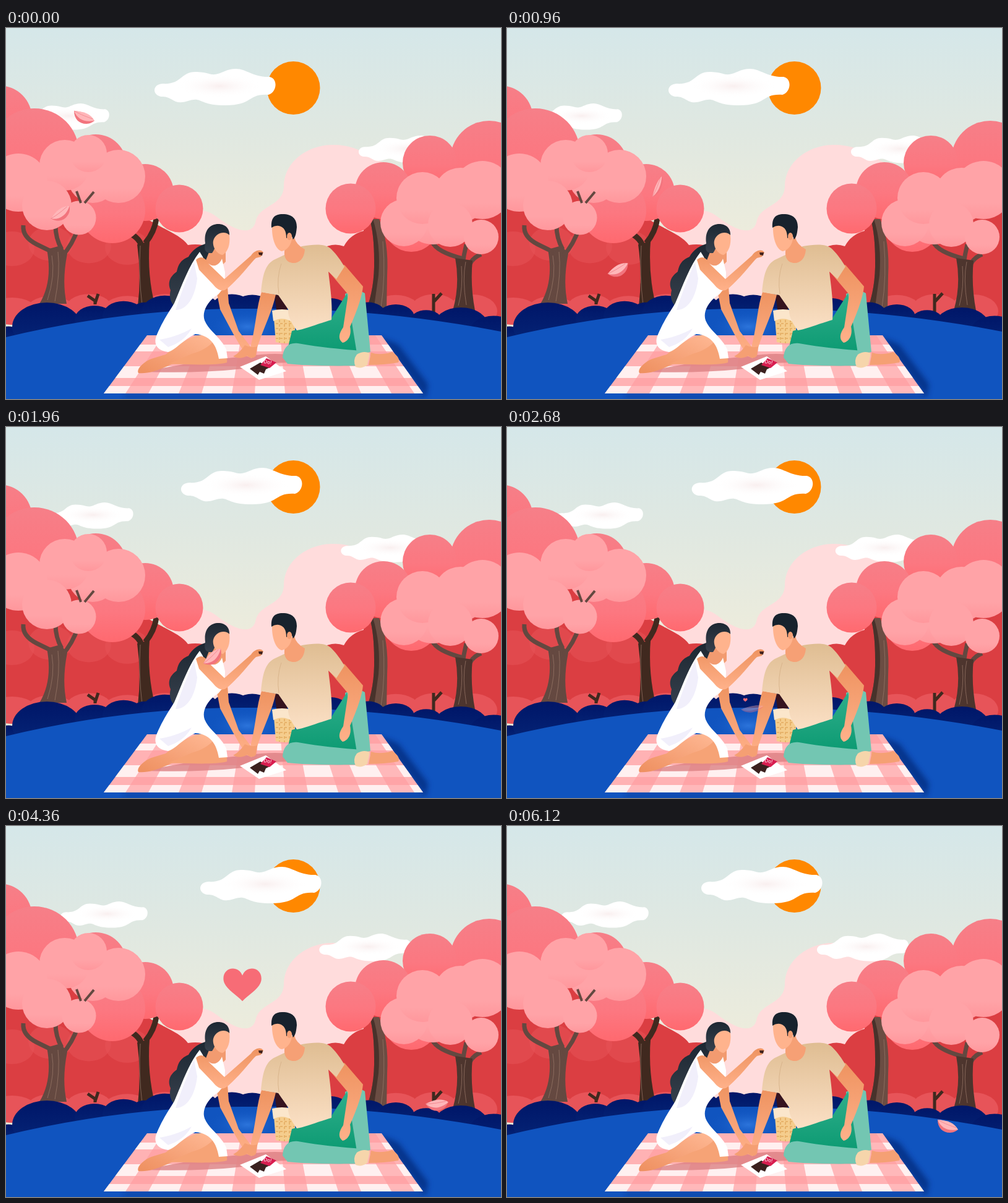
Write an HTML page that moves like this. It is 800x600 px and loops after 6240 ms.

```html
<!DOCTYPE html>
<html lang="en">
<head>
<meta charset="utf-8">
<title>Spring picnic</title>
<style>
html, body { margin: 0; width: 100%; height: 100%; overflow: hidden; background: #dfe8e4; }
svg { display: block; width: 100vw; height: 100vh; }
.limb { fill: none; stroke: #634840; }
.grain { fill: none; stroke: #9b7a6b; stroke-width: .7; }
</style>
</head>
<body>
<svg viewBox="0 0 800 600">
<defs>
  <linearGradient id="sky" gradientUnits="userSpaceOnUse" x1="0" y1="0" x2="0" y2="340">
    <stop offset="0" stop-color="#d5e7e9"/><stop offset=".5" stop-color="#e0e8e1"/><stop offset="1" stop-color="#edecdc"/>
  </linearGradient>
  <linearGradient id="crown" x1="0" y1="0" x2="0" y2="1">
    <stop offset="0" stop-color="#f67f88"/><stop offset=".55" stop-color="#fc7780"/><stop offset="1" stop-color="#ff696f"/>
  </linearGradient>
  <linearGradient id="bloom" x1="0" y1="0" x2="0" y2="1">
    <stop offset=".72" stop-color="#ffa3a7"/><stop offset="1" stop-color="#ff979c"/>
  </linearGradient>
  <linearGradient id="bark">
    <stop offset="0" stop-color="#644840"/><stop offset=".6" stop-color="#6e5046"/><stop offset="1" stop-color="#4b332c"/>
  </linearGradient>
  <linearGradient id="bush" x1="0" y1="0" x2="0" y2="1">
    <stop offset="0" stop-color="#001668"/><stop offset="1" stop-color="#062779"/>
  </linearGradient>
  <linearGradient id="shirt" x1="0" y1="0" x2="0" y2="1">
    <stop offset="0" stop-color="#dfbd92"/><stop offset="1" stop-color="#fbe0c5"/>
  </linearGradient>
  <linearGradient id="skin" x1="0" y1="0" x2="0" y2="1">
    <stop offset="0" stop-color="#ee9360"/><stop offset="1" stop-color="#ffb18a"/>
  </linearGradient>
  <linearGradient id="leg" x1="0" y1="1" x2="1" y2="0">
    <stop offset="0" stop-color="#ee8f5f"/><stop offset="1" stop-color="#ffb995"/>
  </linearGradient>
  <linearGradient id="hair" x1="0" y1="0" x2="0" y2="1">
    <stop offset="0" stop-color="#1d2732"/><stop offset="1" stop-color="#37414d"/>
  </linearGradient>
  <linearGradient id="green" x1="0" y1="0" x2="0" y2="1">
    <stop offset="0" stop-color="#2fae8b"/><stop offset="1" stop-color="#0c9a72"/>
  </linearGradient>
  <radialGradient id="glow"><stop offset="0" stop-color="#2c74db"/><stop offset="1" stop-color="#1054bf" stop-opacity="0"/></radialGradient>
  <radialGradient id="blush"><stop offset="0" stop-color="#f9efef"/><stop offset="1" stop-color="#fff" stop-opacity="0"/></radialGradient>
  <filter id="soft" x="-30%" y="-30%" width="160%" height="160%"><feGaussianBlur stdDeviation="4"/></filter>
  <g id="cloud">
    <path d="M11 45C-4 43-4 25 13 24C44 26 42 5 66 5C86 5 88 10 98 9S116 0 132 0S160 14 186 13C200 16 198 38 184 42C150 40 160 59 115 59S78 44 54 52S30 44 11 45Z" fill="#fff"/>
    <ellipse cx="105" cy="28" rx="70" ry="19" fill="url(#blush)"/>
  </g>
  <g id="petal">
    <path d="M-16-11C-16 2-8 10 4 10C10 10 14 7 17 5C10-6 0-9-16-11Z" fill="#f2747d"/>
    <path d="M-16-11C-11 2 0 8 17 5C11-6 0-10-16-11Z" fill="#ffb6b9"/>
    <path d="M-16-11C-4-4 6-1 14 2" fill="none" stroke="#f0828a" stroke-width=".8"/>
  </g>
</defs>

<rect width="800" height="600" fill="url(#sky)"/>
<circle cx="464.500" cy="97" r="43" fill="#ff8800"/>
<path d="M270 330C290 290 318 288 340 305S395 340 403 315C408 285 446 290 449 258C448 215 490 189 527 189C575 188 590 215 625 222L650 480H270Z" fill="#ffdcdc"/>
<g id="sailing"></g>

<path d="M0 250H230V310C260 328 282 335 294 351Q306 349 318 351V460H0ZM508 358Q528 346 546 353Q556 334 578 328V280H800V480H520Z" fill="#db3e42"/>
<g id="rosy" fill="#e75459"></g>

<path d="M212 350Q219 400 213 450H241Q228 400 232 345Z" fill="#40291f"/>
<path d="M202 333Q220 343 221 362M243 308Q240 330 225 348" class="limb" style="stroke:#40291f" stroke-width="9"/>
<path d="M132 433L145 442L149 430M144 440V447M691 430V462M692 442L704 429" class="limb" style="stroke:#40291f" stroke-width="5"/>
<path d="M588 309H603Q619 345 616 400L615 457H582Q596 420 595 375Q595 335 588 309Z" fill="#6b4d43"/>
<path d="M588 309H593Q606 350 602 400L594 457H582Q596 420 595 375Q595 335 588 309Z" fill="#48322b"/>
<path d="M217 352Q214 400 220 448M609 345Q614 400 606 452" class="grain"/>

<g id="back" fill="url(#crown)"></g>
<g stroke-width="7">
  <path d="M28 319Q26 338 50 350T80 364M80 320Q80 340 90 358M117 322Q108 350 90 370" class="limb"/>
  <path d="M689 346Q696 362 738 373M744 350Q740 366 738 382M768 366Q752 372 747 388" class="limb"/>
</g>
<path d="M66 358Q76 410 54 446H98Q90 410 99 365L88 352ZM726 372Q734 415 722 457H758Q750 415 754 376Z" fill="url(#bark)"/>
<path d="M84 362Q88 395 79 442M74 368Q80 400 67 440M743 378Q737 405 744 448M736 385Q739 420 731 449" class="grain"/>
<g id="front" fill="url(#bloom)"></g>
<path d="M114 264L121 283M142 265L127 283" class="limb" stroke-width="4"/>

<g id="bushes" fill="url(#bush)"></g>
<path d="M0 500Q200 452 400 454Q600 452 800 491V600H0Z" fill="#1054bf"/>
<ellipse cx="390" cy="483" rx="65" ry="28" fill="url(#glow)"/>
<path d="M604 499L676 594H190V597H679L682 576L634 512Z" fill="#03216f" opacity=".65" filter="url(#soft)"/>
<path d="M228 497H607L674 591H158Z" fill="#ffa4a7"/>
<g id="check" fill="#fff"></g>
<path d="M222 556Q310 538 386 531Q430 525 452 528L458 541Q400 542 384 551Q310 559 222 556Z" fill="#dc8184" opacity=".8"/>

<g id="basket">
  <path d="M434 433Q440 428 445 432L455 441L454 462H438Z" fill="#35131f"/>
  <path d="M433 470H467V508Q452 512 436 508Z" fill="#f5cd8d"/>
  <path d="M436 478H466M436 486H466M436 494H466M436 502H466M442 472V509M450 472V510M458 472V509" stroke="#e7b36b" stroke-width="2" stroke-dasharray="4 3"/>
  <path d="M430 457Q447 453 460 457L470 480Q449 464 432 474Z" fill="#fbe6cb"/>
</g>

<g id="woman">
  <path d="M328 348C312 350 300 360 295 370C280 376 278 386 276 394C262 404 262 415 266 424C262 440 270 448 277 456C290 440 296 410 332 368Z" fill="url(#hair)"/>
  <path d="M333 350L355 363V378L343 390L322 378Z" fill="#f29b70"/>
  <path d="M341 430L358 418L360 445L376 490L398 519L397 534L388 530L368 496L346 455Z" fill="url(#skin)"/>
  <path d="M258 528C280 510 300 497 318 496C332 498 339 506 336 516C332 527 300 533 265 545C250 552 230 560 214 558C210 552 222 540 235 535Z" fill="url(#leg)"/>
  <path d="M300 527C320 522 335 510 338 502C350 518 359 530 357 541C335 547 290 543 262 544Z" fill="#f6a376"/>
  <path d="M313 362L318 370C325 387 342 390 349 373L354 395C354 415 348 430 338 434C322 447 317 462 321 473C328 490 347 500 356 520L358 534L344 535C340 512 330 497 306 495C285 505 275 520 262 524C245 522 238 512 243 498C255 470 262 462 272 445C285 415 295 385 313 362Z" fill="#fff"/>
  <path d="M304 378C294 402 282 430 274 456C292 457 306 435 309 405ZM248 504Q275 500 300 486Q288 508 262 516Z" fill="#f1effb"/>
  <path d="M322 348C319 325 332 316 345 317C357 318 362 327 361 336L345 336C339 345 340 355 333 364C321 365 320 357 322 348Z" fill="url(#hair)"/>
  <path d="M335 344C339 330 355 328 361 335C363 350 358 363 350 367C341 366 333 354 335 344Z" fill="#ffb38d"/>
  <path d="M307 375C315 367 323 372 328 382L353 406L396 368C402 359 412 357 416 363L412 370L404 372C396 379 380 402 358 421C350 428 342 424 334 414L312 391Z" fill="url(#skin)"/>
  <path d="M408 363L415 363L414 368L409 367Z" fill="#43231d"/>
</g>

<g id="man">
  <path d="M413 427L436 431C430 460 414 490 405 520L403 531L394 532L396 512C404 480 405 450 413 427Z" fill="url(#skin)"/>
  <path d="M367 531Q377 526 386 513Q397 518 406 515L404 530Q398 537 390 530Q378 537 367 531Z" fill="#f59f73"/>
  <path d="M548 430Q566 420 580 429L589 524L568 528L552 490Z" fill="#73c6b2"/>
  <path d="M462 490L524 472Q538 450 551 429L558 470L567 526L455 520Z" fill="url(#green)"/>
  <path d="M447 533C448 517 456 508 472 510C500 515 530 519 586 523L570 546C530 547 480 546 455 543Z" fill="#73c6b2"/>
  <path d="M520 392L547 383L577 418Q575 440 556 483C559 497 553 507 544 509C536 503 538 494 545 484L553 431Z" fill="url(#skin)"/>
  <path d="M590 525Q604 530 624 524Q638 533 634 541Q610 545 586 545Z" fill="#f5a074"/>
  <path d="M567 528Q578 521 588 526L584 545Q574 552 565 548Q560 537 567 528Z" fill="#f6d5ab"/>
  <path d="M412 427C415 400 418 382 435 374L452 366L478 353C500 349 518 349 526 358C535 367 541 376 547 386L534 406L521 394C524 420 528 445 526 472C508 477 484 487 470 489C461 477 455 465 456 455L440 432Z" fill="url(#shirt)"/>
  <path d="M441 430Q437 404 445 381" fill="none" stroke="#d9b58c"/>
  <path d="M452 347L466 338Q468 350 483 358C482 373 474 381 463 380C454 379 449 372 450 361Z" fill="#f6a075"/>
  <path d="M430 318C440 313 457 318 462 335C463 350 454 360 445 361C435 357 429 340 430 318Z" fill="#ffb38d"/>
  <path d="M429 323C428 307 434 301 447 301C463 301 470 309 470 322C469 332 468 338 464 342L461 334L453 340C453 329 450 322 441 320Q435 319 429 323Z" fill="#17222d"/>
  <ellipse cx="458" cy="337" rx="4" ry="6" fill="#f6a075"/>
</g>

<path d="M378 548L420 531L453 555L409 569Z" fill="#fff"/>
<path d="M394 551L411 541L426 549L420 552L417 559L410 556L407 561Z" fill="#3b211f"/>
<path d="M411 545L421 534L437 541L426 550Z" fill="#d81e50"/>
<text transform="translate(416 542) rotate(9)" font-family="Inter, Arial, sans-serif" font-size="8" fill="#fff">Do!</text>

<path id="heart" d="M0 37C-16 20-43 7-43-14C-43-41-9-45 0-21C9-45 43-41 43-14C43 7 16 20 0 37Z" fill="#f76c76"/>
<g id="falling"></g>
</svg>
<script>
const LOOP = 6240, STEP = 40, LAST = 6120;
const $ = id => document.getElementById(id);
const lerp = (a, b, k) => a + (b - a) * k;
const clamp = k => Math.min(1, Math.max(0, k));
const easeOut = (k, power) => 1 - (1 - k) ** power;

function add(parent, tag, attrs) {
  const node = document.createElementNS("http://www.w3.org/2000/svg", tag);
  for (const key in attrs) node.setAttribute(key, attrs[key]);
  $(parent).append(node);
  return node;
}
const oval = (parent, cx, cy, rx, ry = rx) => add(parent, "ellipse", { cx, cy, rx, ry });

// Tree crowns: x, y, radius.
const crowns = {
  back: [[-11, 146, 53], [145, 222, 50], [46, 202, 72], [225, 266, 46], [172, 295, 53], [280, 292, 38.5],
    [781, 213, 63], [685, 218, 44], [610, 263, 46], [655, 318, 44], [557, 292, 40.5]],
  front: [[140, 243, 40], [182, 240, 43], [95, 222, 41], [133, 203, 30], [20, 250, 47], [66, 287, 40], [118, 307, 27.5],
    [690, 300, 50], [735, 270, 44], [770, 262, 47], [643, 315, 38], [673, 275, 42], [718, 318, 36], [768, 338, 28]]
};
for (const name in crowns) crowns[name].forEach(c => oval(name, ...c));

// Undergrowth in two scalloped rows on each side.
let seed = 7;
const random = () => (seed = seed * 16807 % 2147483647) / 2147483647;
for (let x = 10; x < 810; x += 62) {
  if (x > 290 && x < 590) continue;
  oval("rosy", x, 458, 40, 22 + 8 * random());
  if (x < 220) oval("rosy", x, 346 + 12 * random(), 36, 28).setAttribute("opacity", .5);
}

// Bushes sit on the curve of the hill: x, half width.
const hill = x => 454 + 42 * ((x - 400) / 400) ** 2;
[[4, 18], [66, 56], [143, 32], [190, 34], [225, 26], [257, 38], [310, 36], [365, 34], [398, 32], [440, 36],
  [525, 30], [585, 28], [630, 30], [679, 26], [735, 45], [788, 40]]
  .forEach(([x, r]) => oval("bushes", x, hill(x), r, r * .7));

// Gingham cloth in perspective.
function cell(u0, u1, y0, y1, opacity) {
  const edge = (u, y) => {
    const k = (y - 497) / 94;
    return lerp(lerp(228, 158, k), lerp(607, 674, k), clamp(u));
  };
  add("check", "path", { d: `M${edge(u0, y0)} ${y0}H${edge(u1, y0)}L${edge(u1, y1)} ${y1}H${edge(u0, y1)}Z`, opacity });
}
const rows = [[512, 523], [547, 566], [579, 591]];
rows.forEach(row => cell(0, 1, ...row, .22));
for (let u = -.027; u < 1; u += 1 / 6) {
  cell(u, u + .095, 497, 591, .15);
  rows.forEach(row => cell(u, u + .095, ...row, .75));
}

const clouds = [
  { from: 240, to: 314, y: 66, scale: 1, time: 3380 },
  { from: 26, to: 88, y: 122, scale: .72, time: 3130 },
  { from: 570, to: 501, y: 174, scale: .757, time: 4720 }
];
const petals = [
  { start: 0, time: 2960, from: [126, 145], to: [442, 488], turn: [0, -98], sway: 16, flutter: -60, waves: 1.5, power: 1 },
  { start: 0, time: 1400, from: [90, 300], to: [223, 433], turn: [-60, -50], sway: 0, flutter: 0, waves: 1, power: 1 },
  { start: 2700, time: 2300, from: [770, 300], to: [712, 486], turn: [-110, 0], sway: -33, flutter: 0, waves: 1, power: 1.3, lands: true }
];
clouds.forEach(c => c.node = add("sailing", "use", { href: "#cloud" }));
petals.forEach(p => p.node = add("falling", "use", { href: "#petal" }));

function place(node, transform, opacity = 1) {
  node.setAttribute("transform", transform);
  node.setAttribute("opacity", opacity);
}

function drawPetal(p, t) {
  const k = clamp((t - p.start) / p.time), e = easeOut(k, p.power);
  const wave = Math.sin(Math.PI * p.waves * k);
  const x = lerp(p.from[0], p.to[0], e) + p.sway * wave;
  const y = lerp(p.from[1], p.to[1], e);
  const angle = lerp(...p.turn, k) + p.flutter * wave;
  const squash = 1 - Math.abs(p.flutter * wave) / 130;
  place(p.node, `translate(${x} ${y}) rotate(${angle + 26}) scale(1 ${squash}) rotate(-26)`,
    clamp(4 * (p.lands ? k : 1 - k)));
}

function drawHeart(t) {
  const k = clamp((t - 2600) / 2520);
  const x = lerp(386, 392, k) - 10 * Math.sin(Math.PI * k);
  const y = lerp(452, 212, easeOut(k, 1.4));
  place($("heart"), `translate(${x} ${y}) scale(${lerp(.05, 1, k)})`, k > 0 ? 1 - clamp((t - 4600) / 1500) : 0);
}

function draw(t) {
  clouds.forEach(c => place(c.node, `translate(${lerp(c.from, c.to, clamp(t / c.time))} ${c.y}) scale(${c.scale})`));
  petals.forEach(p => drawPetal(p, t));
  drawHeart(t);
}

const start = performance.now();
function tick(now) {
  const t = Math.max(0, now - start) % LOOP;
  draw(Math.min(LAST, Math.floor(t / STEP) * STEP));
  requestAnimationFrame(tick);
}
draw(0);
requestAnimationFrame(tick);
</script>
</body>
</html>
```
